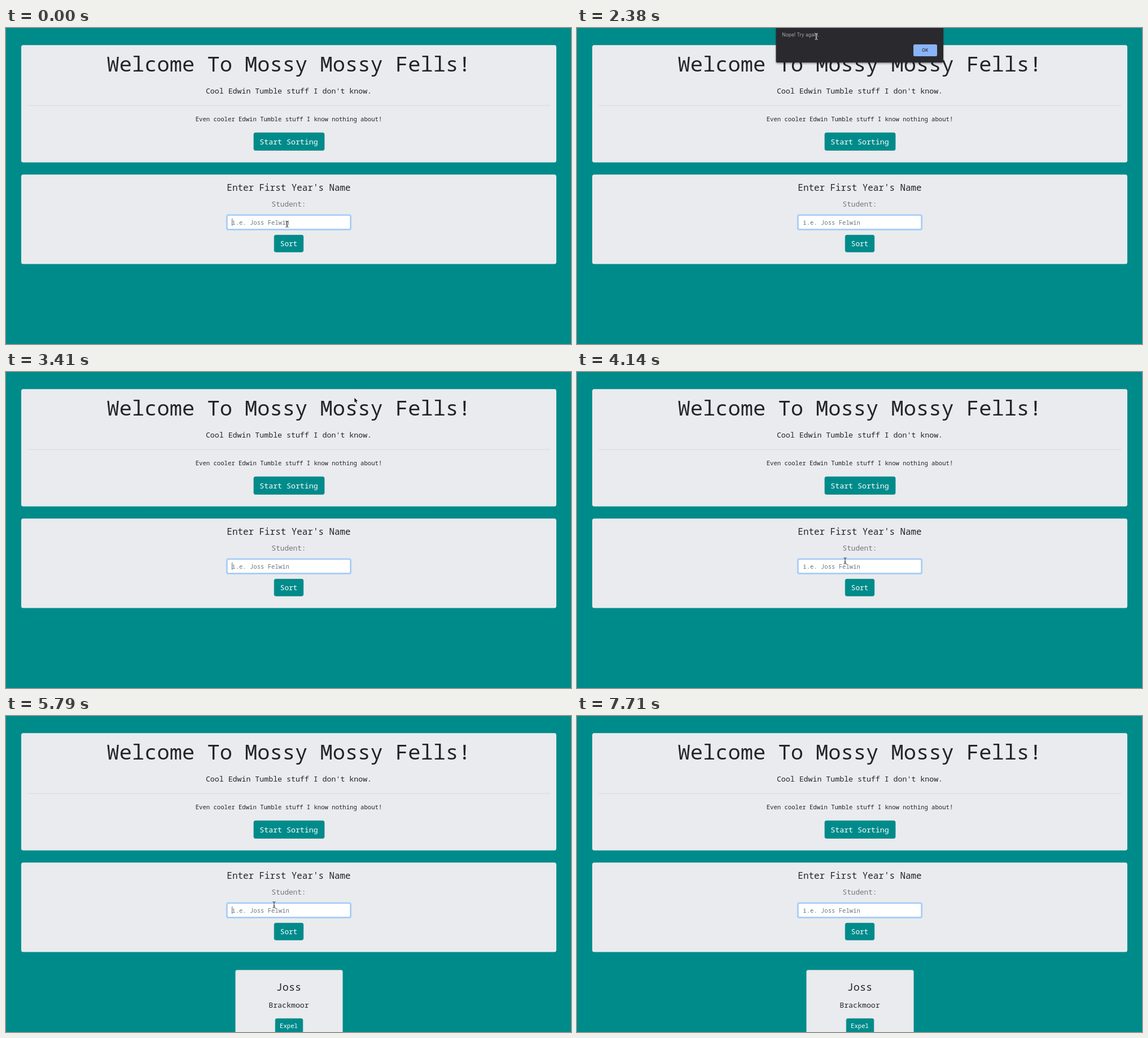
Recreate the animation shown at these times as an HTML page. Size 1001 by 559 pixels, loop 7810 ms.

```html
<!DOCTYPE html>
<html lang="en">
<head>
<meta charset="utf-8">
<title>Student sorter</title>
<style>
  html, body { margin: 0; width: 100%; height: 100%; overflow: hidden; background: #008b8b; }
  svg { display: block; width: 1001px; height: 559px; }
  text { font-family: "Noto Sans Mono", "Liberation Mono", monospace; fill: #212529; white-space: pre; }
  .mid { text-anchor: middle; }
  .panel { fill: #e9ebee; }
  .button { fill: #008b8b; stroke: #007f80; stroke-width: .7; }
  .label { fill: #fff; font-weight: 500; }
  .dialog text { font-family: Inter, Roboto, sans-serif; }
</style>
</head>
<body>
<svg viewBox="0 0 1001 559">
  <defs>
    <filter id="shadow" x="-5%" y="-20%" width="110%" height="150%">
      <feDropShadow dx="0" dy="2" stdDeviation="1.8" flood-opacity=".4"/>
    </filter>
  </defs>

  <rect class="panel" x="27" y="30.3" width="948" height="207.5" rx="3.5"/>
  <text class="mid" x="501" y="77" font-size="37.1">Welcome To Mossy Mossy Fells!</text>
  <text class="mid" x="501" y="115.6" font-size="13.25">Cool Edwin Tumble stuff I don't know.</text>
  <path d="M37.5 137H964.5" stroke="#d3d5d8" stroke-width=".9"/>
  <text class="mid" x="501" y="165" font-size="10.6">Even cooler Edwin Tumble stuff I know nothing about!</text>
  <rect class="button" x="439" y="185.3" width="125" height="31.2" rx="3"/>
  <text class="mid label" x="501" y="205.7" font-size="13.25">Start Sorting</text>

  <rect class="panel" x="27" y="259.3" width="948" height="158.2" rx="3.5"/>
  <text class="mid" x="501" y="288" font-size="15.9">Enter First Year's Name</text>
  <text class="mid" x="501" y="316" font-size="12.7" style="fill:#75777a">Student:</text>
  <rect x="389.9" y="329.4" width="222.2" height="28.6" rx="4" fill="#b0cff2"/>
  <rect x="392.1" y="331.6" width="217.8" height="24.2" rx="2.5" fill="#fff" stroke="#80bdff" stroke-width=".8"/>
  <text id="value" x="400.2" y="347.6" font-size="10.6"></text>
  <rect id="caret" y="337" width=".9" height="13" fill="#495057"/>
  <rect class="button" x="475.2" y="366.3" width="51.6" height="30" rx="3"/>
  <text class="mid label" x="501" y="385.9" font-size="12.7">Sort</text>

  <g id="card">
    <rect class="panel" x="406.7" y="449.6" width="189.6" height="140" rx="2.5" stroke="#cdd6d9" stroke-width=".6"/>
    <text class="mid" x="501" y="486.4" font-size="18.55">Joss</text>
    <text class="mid" x="501" y="516" font-size="13.25">Brackmoor</text>
    <rect class="button" x="477.2" y="535.3" width="48.6" height="26" rx="2.8"/>
    <text class="mid label" x="501" y="552" font-size="10.6">Expel</text>
  </g>

  <g id="dialog" class="dialog">
    <path d="M352.5-8H649V59a2 2 0 0 1-2 2H354.500a2 2 0 0 1-2-2Z" fill="#292a2d" filter="url(#shadow)"/>
    <text x="363.3" y="15.4" font-size="8.45" style="fill:#a9abae">Nope! Try again.</text>
    <rect x="596" y="29" width="42" height="21" rx="2.5" fill="#8ab4f8"/>
    <text class="mid" x="616.7" y="42.4" font-size="7.8" font-weight="500" style="fill:#26292f">OK</text>
  </g>

  <circle id="ring" cx="618" cy="45" r="6.5" fill="none" stroke="#30343c" stroke-width=".9"/>
  <g id="arrow">
    <path d="M0 0V9.600L2.200 7.600L3.700 11.100L5.500 10.300L4 6.900H7Z" fill="#000" stroke="#fff" stroke-width=".8"/>
  </g>
  <g id="beam" fill="none">
    <path id="stem" d="M-2.500-5.500Q-.3-5.500 0-4Q.3-5.500 2.500-5.500M0-4V4M-2.500 5.500Q-.3 5.500 0 4Q.3 5.500 2.500 5.500M-1.300 2H1.300" stroke="#222" stroke-width="1"/>
  </g>
</svg>
<script>
  const LOOP = 7810;
  const HINT = "i.e. Joss Felwin";
  const NAME = "Joss";
  const part = id => document.getElementById(id);

  // Each track lists [start in ms, state...]; a state holds until the next.
  const cursorTrack = [
    [0, "beam", 498, 347], [740, "arrow", 498, 346],
    [1640, "beam", 432, 14], [1790, "beam", 404, 14], [1930, "beam", 380, 14], [2080, "beam", 366, 13.5],
    [2380, "beam", 424, 15], [2530, "arrow", 545, 32], [2680, "arrow", 612, 44], [2830, "arrow", 617, 45],
    [3560, "arrow", 598, 120], [3700, "arrow", 535, 262], [3850, "beam", 490, 343],
    [4000, "beam", 477, 338], [4140, "beam", 475, 334],
    [4290, "beam", 478, 332], [4440, "beam", 475, 334],
    [6540, "beam", 486, 342], [6680, "arrow", 505, 350], [6830, "none", 0, 0],
    [7270, "arrow", 985, 546], [7570, "arrow", 954, 538], [7710, "none", 0, 0]
  ];
  const caretTrack = [
    [0, 1], [300, 0], [740, 1], [1640, 0], [3410, 1], [4000, 0],
    [4290, 1], [6390, 0], [6830, 1], [7120, 0]
  ];
  const dialogTrack = [[0, "none"], [1040, "open"], [3270, "fading"], [3410, "none"]];
  const typedTrack = [[0, 0], [4890, 1], [5190, 2], [5340, 3], [5490, 4], [5790, 0]];

  const at = (track, time) => track.findLast(step => step[0] <= time).slice(1);
  const show = (id, visible) => { part(id).style.display = visible ? "" : "none"; };

  function draw(time) {
    const [kind, x, y] = at(cursorTrack, time);
    for (const id of ["arrow", "beam"]) {
      show(id, kind === id);
      part(id).setAttribute("transform", `translate(${x} ${y})`);
    }
    part("stem").setAttribute("stroke", y < 60 ? "#ddd" : "#222");

    const [typed] = at(typedTrack, time);
    part("value").textContent = typed ? NAME.slice(0, typed) : HINT;
    part("value").style.fill = typed ? "#495057" : "#6c757d";
    part("caret").setAttribute("x", 400.2 + typed * 6.36);
    show("caret", at(caretTrack, time)[0]);

    const [dialog] = at(dialogTrack, time);
    const fading = dialog === "fading";
    show("dialog", dialog !== "none");
    part("dialog").setAttribute("opacity", fading ? .92 : 1);
    part("dialog").setAttribute("transform", fading ? "translate(.3 -1.1)" : "");
    show("ring", time >= 3120 && time < 3410);
    show("card", time >= 5790);
  }

  function tick() {
    draw(performance.now() % LOOP);
    requestAnimationFrame(tick);
  }
  tick();
</script>
</body>
</html>
```
